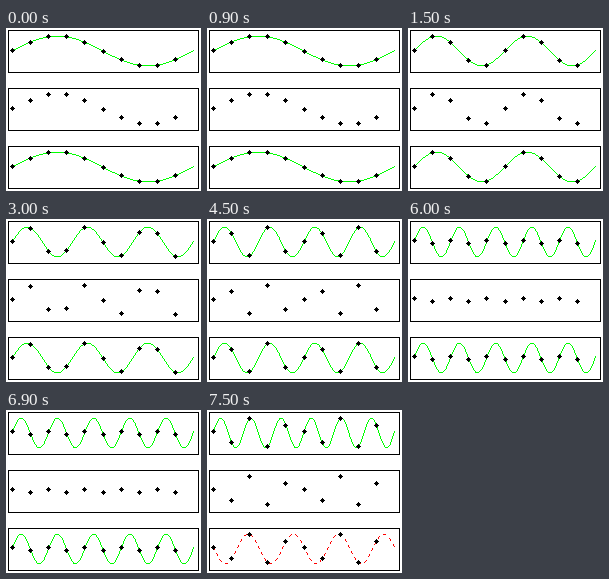
Recreate the animation shown at these times as a matplotlib script. Size 195 by 163 pixels, loop 8000 ms.

```python
import numpy as np
import matplotlib.pyplot as plt
from matplotlib.animation import FuncAnimation
from matplotlib.collections import PolyCollection
from matplotlib.patches import Polygon, Rectangle

W, H, DPI = 195, 163, 64
PX = 72 / DPI                      # one pixel in points
STEP_MS, LOOP_MS, HOLD_MS = 500, 8000, 1500

PANEL_TOPS = (2, 60, 118)
BOX_W, BOX_H = 190, 42
MID, AMP = 20.5, 14.9              # wave centre below panel top, height
LEFT, ORIGIN = 6, 5.6              # first column, zero of the sine
PERIOD, SAMPLES = 181, 10
DASH = 3
GREEN, RED = "#00ff00", "#ff0000"

# outline of a five-pixel diamond built from whole pixels
quarter = np.array([(0.5, -2.5), (0.5, -1.5), (1.5, -1.5), (1.5, -0.5), (2.5, -0.5)])
turn = np.array([(0, 1), (-1, 0)])
DIAMOND = np.vstack([quarter @ np.linalg.matrix_power(turn, n) for n in range(4)])
SQUARE = np.array([(0.05, 0.05), (0.95, 0.05), (0.95, 0.95), (0.05, 0.95)])

fig = plt.figure(figsize=(W / DPI, H / DPI), dpi=DPI, facecolor="white")
ax = fig.add_axes([0, 0, 1, 1])
ax.set_xlim(0, W)
ax.set_ylim(H, 0)
ax.axis("off")

curve_x = np.arange(LEFT, LEFT + PERIOD + 1)
sample_x = LEFT + np.arange(SAMPLES) * PERIOD / SAMPLES


def wave(x, cycles, top):
    return top + MID - AMP * np.sin(2 * np.pi * cycles * (x - ORIGIN) / PERIOD)


def alias(x, cycles, top):
    """Lowest-frequency sine through the same samples."""
    low = cycles if cycles <= SAMPLES / 2 else cycles - SAMPLES
    turns = cycles * (LEFT - ORIGIN) + low * (x - LEFT)
    return top + MID - AMP * np.sin(2 * np.pi * turns / PERIOD)


def nearest(v):
    return np.floor(v + 0.5)


def trace(ys):
    """Pixels of a one-pixel line joining the curve's columns."""
    ys = nearest(ys)
    pixels = []
    for x, y, y_next in zip(curve_x, ys, ys[1:]):
        n = max(1, int(abs(y_next - y)))
        t = np.arange(n) / n
        pixels.append(np.column_stack([nearest(x + t), nearest(y + t * (y_next - y))]))
    pixels.append([(curve_x[-1], ys[-1])])
    return np.vstack(pixels)


def show(curve, pixels):
    curve.set_verts(pixels[:, None, :] + SQUARE)


def make_curve():
    curve = PolyCollection([], facecolors=GREEN, edgecolors="none",
                           linewidths=0, antialiaseds=False, zorder=2)
    return ax.add_collection(curve, autolim=False)


def make_dots():
    return [ax.add_patch(Polygon(DIAMOND, closed=True, fc="black", ec="none",
                                 lw=0, antialiased=False, zorder=3))
            for _ in range(SAMPLES)]


for top in PANEL_TOPS:
    ax.add_patch(Rectangle((2.5, top + 0.5), BOX_W, BOX_H, fill=False, ec="black",
                           lw=PX / 2, antialiased=False, snap=False, zorder=1))

signal, rebuilt = make_curve(), make_curve()
dots = [make_dots() for _ in PANEL_TOPS]


def update(i):
    cycles = 1 + i * STEP_MS // HOLD_MS
    aliased = cycles > SAMPLES / 2

    show(signal, trace(wave(curve_x, cycles, PANEL_TOPS[0])))
    pixels = trace(alias(curve_x, cycles, PANEL_TOPS[2]))
    if aliased:
        pixels = pixels[np.arange(len(pixels)) // DASH % 2 == 0]
    show(rebuilt, pixels)
    rebuilt.set_facecolor(RED if aliased else GREEN)

    for top, row in zip(PANEL_TOPS, dots):
        ys = nearest(wave(sample_x, cycles, top)) + 0.5
        for dot, x, y in zip(row, nearest(sample_x) + 0.5, ys):
            dot.set_xy(DIAMOND + (x, y))
    return [signal, rebuilt, *sum(dots, [])]


anim = FuncAnimation(fig, update, frames=LOOP_MS // STEP_MS, interval=STEP_MS,
                     repeat=True, repeat_delay=0, blit=False)
plt.show()
```
